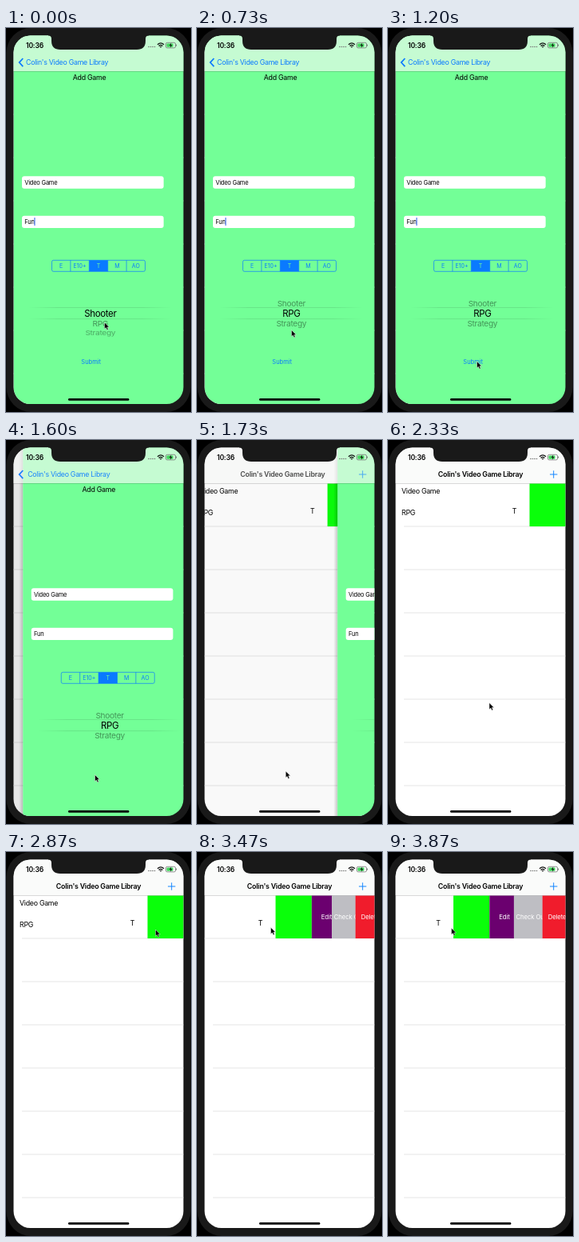
An HTML page for the animation above (3990 ms loop, 232x480 px).

```html
<!DOCTYPE html>
<html lang="en">
<head>
<meta charset="utf-8">
<title>Game library</title>
<style>
html, body { margin: 0; width: 100%; height: 100%; overflow: hidden; background: #000; }
svg { display: block; width: 232px; height: 480px; }
text { font-family: Inter, Roboto, sans-serif; font-size: 8.8px; letter-spacing: -.03em; }
.mid { text-anchor: middle; }
.blue { fill: #0a7aff; }
.bold { font-weight: 600; letter-spacing: -.025em; }
.field { font-size: 7.5px; }
.seg { font-size: 7px; letter-spacing: 0; }
.action { font-size: 7.8px; letter-spacing: -.02em; fill: #fff; }
.wheel { font-size: 10.1px; }
</style>
</head>
<body>
<svg viewBox="0 0 232 480" xmlns="http://www.w3.org/2000/svg">
  <defs>
    <clipPath id="screen"><rect x="9.5" y="9.5" width="213" height="460.5" rx="21"/></clipPath>
    <linearGradient id="shade"><stop offset="0" stop-opacity="0"/><stop offset="1" stop-opacity=".2"/></linearGradient>
    <linearGradient id="rule">
      <stop offset="0" stop-opacity="0"/><stop offset=".2" stop-opacity=".14"/>
      <stop offset=".8" stop-opacity=".14"/><stop offset="1" stop-opacity="0"/>
    </linearGradient>
  </defs>
  <rect width="232" height="480"/>
  <rect x=".5" width="231" height="480" rx="31" fill="#191919"/>
  <g clip-path="url(#screen)">
    <g id="list">
      <rect x="9" y="9" width="214" height="462" fill="#fff"/>
      <g id="lines" fill="#dedede"></g>
      <g id="row">
        <rect x="20" y="107.6" width="300" height=".8" fill="#dedede"/>
        <text x="17" y="67">Video Game</text>
        <text x="17" y="94">RPG</text>
        <text x="158.5" y="92" class="mid">T</text>
        <rect x="177.5" y="54.5" width="45.3" height="53.5" fill="#0aff0a"/>
      </g>
      <g id="actions"></g>
    </g>
    <rect id="dim" x="9" y="9" width="214" height="462"/>
    <g id="form">
      <rect x="4.5" y="9" width="5" height="462" fill="url(#shade)"/>
      <rect x="9.5" y="9" width="214" height="462" fill="#73ff97"/>
      <text x="104.5" y="65.3" class="mid">Add Game</text>
      <rect x="20" y="185.3" width="177.7" height="15.4" rx="3" fill="#fff"/>
      <text x="23.3" y="195.8" class="field">Video Game</text>
      <rect x="20" y="234.8" width="177.7" height="15.2" rx="3" fill="#fff"/>
      <text x="23.3" y="245.2" class="field">Fun</text>
      <rect id="caret" x="35.4" y="237" width="1.1" height="10" fill="#3b6cf0"/>
      <g id="segs"></g>
      <rect x="28" y="349" width="180" height=".7" fill="url(#rule)"/>
      <rect x="28" y="363.4" width="180" height=".7" fill="url(#rule)"/>
      <g id="wheel"></g>
      <text id="submit" x="106.7" y="420.3" class="mid blue field" style="letter-spacing:0">Submit</text>
    </g>
    <rect x="9" y="9" width="214" height="45" fill="#f7f8f7" fill-opacity=".62"/>
    <rect x="9" y="54" width="214" height=".6" fill-opacity=".25"/>
    <path id="chevron" d="M21.3 38l-4.7 5.1 4.7 5.1" fill="none" stroke="#0a7aff" stroke-width="1.7"/>
    <text id="back" x="25" y="46.2" class="blue">Colin's Video Game Libray</text>
    <text id="title" x="116" y="46.2" class="mid bold">Colin's Video Game Libray</text>
    <path id="plus" d="M203 43h9.4M207.7 38.3v9.4" stroke="#1487ff" stroke-width="1"/>
    <text x="25" y="25" class="bold" style="font-size:8.6px">10:36</text>
    <g fill="#777">
      <circle cx="179" cy="23.5" r=".8"/><circle cx="181.5" cy="23.5" r=".8"/>
      <circle cx="184" cy="23.5" r=".8"/><circle cx="186.5" cy="23.5" r=".8"/>
    </g>
    <g fill="none" stroke="#111" stroke-width="1.3">
      <path d="M190 20.7q4-3.6 8 0M191.6 22.4q2.4-2.1 4.8 0"/>
      <path d="M193.2 23.4h1.6l-.8.9z" stroke-width=".9"/>
    </g>
    <rect x="200.4" y="18.3" width="12.2" height="6.6" rx="1.8" fill="none" stroke="#666" stroke-width=".7"/>
    <rect x="201.5" y="19.4" width="8" height="4.4" rx=".8" fill="#41d65c"/>
    <path d="M213.5 20.6v2" stroke="#666" stroke-width=".9"/>
    <path d="M207.3 18.6l-2.6 3.4h1.8l-.7 2.7 2.7-3.5h-1.8z" fill="#111"/>
    <rect x="78" y="463" width="76.4" height="2.8" rx="1.4"/>
  </g>
  <path d="M53 9h126v.5q-4 0-4 4v2.5q0 11-11 11h-96q-11 0-11-11v-2.5q0-4-4-4z" fill="#191919"/>
  <path id="mouse" d="M0 0v8.2l1.9-1.7 1.3 3 1.5-.7-1.3-2.9h2.5z" stroke="#fff" stroke-opacity=".75" stroke-width=".6"/>
</svg>
<script>
const LOOP = 3990, WIDTH = 213, RIGHT = 222.8;
const $ = id => document.getElementById(id);
const set = (el, attrs) => { for (const k in attrs) el.setAttribute(k, attrs[k]); };
const clamp = v => Math.max(0, Math.min(1, v));
const smooth = v => { v = clamp(v); return v * v * (3 - 2 * v); };
const shift = (el, x, y = 0) => set(el, { transform: `translate(${x} ${y})` });

// keys: [time, value, value...], linear between
function track(keys, t) {
  let i = 1;
  while (i < keys.length - 1 && t > keys[i][0]) i++;
  const a = keys[i - 1], b = keys[i], u = clamp((t - a[0]) / (b[0] - a[0]));
  return a.slice(1).map((v, k) => v + (b[k + 1] - v) * u);
}

const mousePath = [
  [0, 123.5, 368], [267, 123.5, 368], [600, 118.5, 377.5], [800, 118.5, 377.5],
  [1133, 111.5, 415], [1267, 111.5, 418.5], [1667, 111.5, 418.5], [1933, 110.5, 400],
  [2200, 119, 357], [2267, 119, 357], [2400, 135, 300], [2600, 170, 165], [2733, 185, 108],
  [2800, 187.5, 97], [2867, 187.5, 97], [3000, 164, 96], [3200, 124, 95], [3333, 104, 94.5],
  [3467, 92.5, 94.3], [3667, 84, 94.5], [3867, 79.5, 95]
];
const swipePath = [
  [2867, 0], [3000, 12], [3200, 42], [3333, 66], [3467, 79], [3667, 89], [3867, 95.5]
];
const actions = [
  { label: "Edit", color: "#6b006f", share: .32, pad: 12 },
  { label: "Check Out", color: "#bebec3", share: .375, pad: 2.7 },
  { label: "Delete", color: "#f01c2c", share: .305, pad: 7 }
];
const genres = ["Shooter", "RPG", "Strategy"];
const ratings = ["E", "E10+", "T", "M", "AO"];

for (let y = 162; y < 460; y += 54)
  $("lines").innerHTML += `<rect x="20" y="${y - .4}" width="300" height=".8"/>`;

$("segs").innerHTML = ratings.map((r, i) => {
  const x = 57.5 + i * 23.4, on = r === "T";
  return `<rect x="${x}" y="290.3" width="23.4" height="14" fill="${on ? "#0a7aff" : "none"}"/>
    ${i ? `<path d="M${x} 290.3v14" stroke="#0a7aff" stroke-width=".7"/>` : ""}
    <text x="${x + 11.7}" y="299.8" class="mid seg" fill="${on ? "#73ff97" : "#0a7aff"}">${r}</text>`;
}).join("") + `<rect x="57.5" y="290.3" width="117" height="14" rx="2" fill="none" stroke="#0a7aff" stroke-width=".7"/>`;

$("wheel").innerHTML = genres.map(g => `<text y="3.7" class="mid wheel">${g}</text>`).join("");
const wheelItems = [...$("wheel").children];

$("actions").innerHTML = actions.map(a =>
  `<g><rect y="54.5" height="53.5" fill="${a.color}"/><text y="84" class="action">${a.label}</text></g>`).join("");
const buttons = [...$("actions").children];

function drawWheel(pos) {
  wheelItems.forEach((el, i) => {
    const d = i - pos, far = Math.abs(d), angle = d * .33;
    const zoom = 1 + .14 * (1 - smooth(far * 1.5));
    const fade = far < 1 ? 1 - .58 * smooth(far * 1.3) : .42 - .08 * (far - 1);
    set(el, {
      transform: `translate(118.3 ${357 + 39 * Math.sin(angle)}) scale(${zoom} ${zoom * Math.cos(angle)})`,
      opacity: fade
    });
  });
}

function drawRow(dx) {
  shift($("row"), -dx);
  let x = RIGHT - dx;
  actions.forEach((a, i) => {
    const [box, label] = buttons[i].children;
    set(box, { x, width: dx * a.share + .2 });
    set(label, { x: x + a.pad });
    x += dx * a.share;
  });
  set($("actions"), { opacity: dx > 0 ? 1 : 0 });
}

function drawPop(t) {
  const s = Math.max(0, t - 1580) * .0188;
  let p = 1 - (1 + s) * Math.exp(-s);
  if (p > .997) p = 1;
  shift($("form"), p * (WIDTH + (p === 1 ? 9 : 0)));
  shift($("list"), -.3 * WIDTH * (1 - p));
  set($("dim"), { opacity: .1 * (1 - p) });
  shift($("back"), 39.5 * p);
  shift($("title"), -39.5 * (1 - p));
  set($("back"), { opacity: clamp(1 - p * 1.4) });
  set($("chevron"), { opacity: clamp(1 - p * 1.4) });
  set($("title"), { opacity: clamp(p * 1.4 - .4) });
  set($("plus"), { opacity: clamp(p * 1.4 - .4) });
}

function draw(ms) {
  const t = Math.floor((ms + 4) * .015) / .015;
  drawWheel(smooth((t - 90) / 450));
  set($("caret"), { opacity: t < 1300 && (t + 350) % 1000 < 650 ? 1 : 0 });
  set($("submit"), { opacity: 1 - clamp((t - 1200) / 130) });
  drawPop(t);
  drawRow(track(swipePath, t)[0]);
  shift($("mouse"), ...track(mousePath, t));
}

const start = performance.now();
function tick() {
  draw((performance.now() - start) % LOOP);
  requestAnimationFrame(tick);
}
tick();
</script>
</body>
</html>
```
